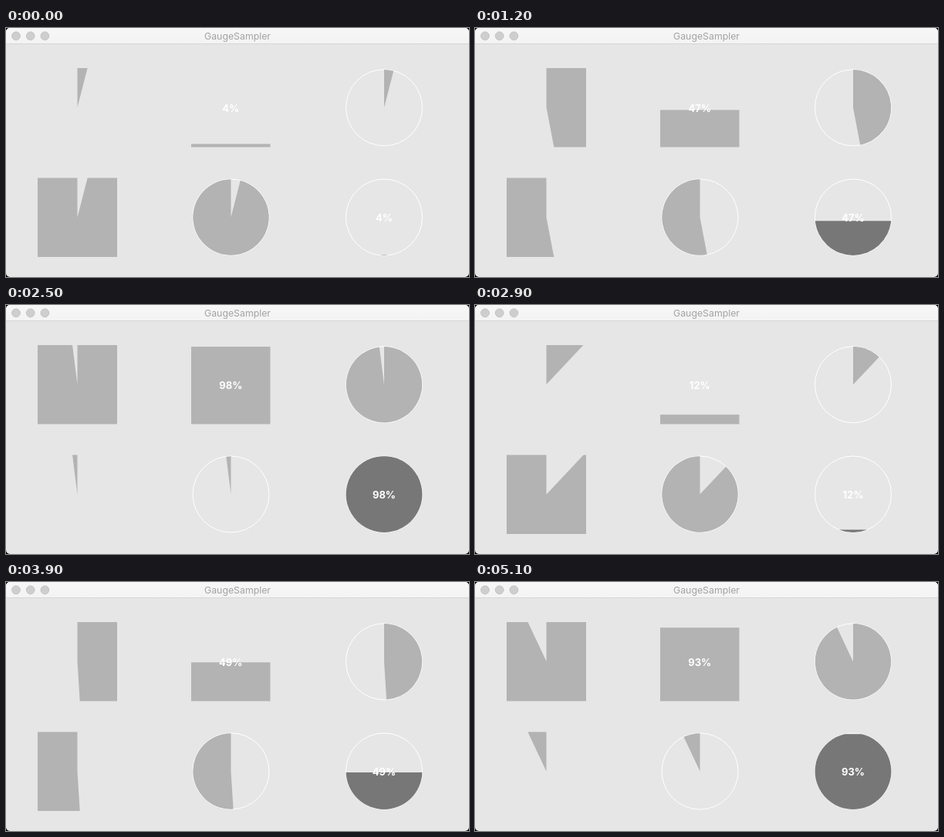
An HTML page that plays this animation: 600 by 323 pixels, repeating every 5.2 s.

```html
<!DOCTYPE html>
<html lang="en">
<head>
<meta charset="utf-8">
<title>GaugeSampler</title>
<style>
  html, body { margin: 0; width: 100%; height: 100%; overflow: hidden; background: #000; }
  svg { display: block; width: 600px; height: 323px; }
  text { font-family: Inter, "Open Sans", sans-serif; text-anchor: middle; }
  .title { font-size: 12.3px; fill: #a3a3a3; }
  .label { font-size: 13px; font-weight: 700; fill: #fff; }
  .fill { fill: #b3b3b3; }
  .level { fill: #777; }
  .ring { fill: none; stroke: #fff; stroke-width: 1; }
  .light { fill: #cecece; stroke: #bcbcbc; stroke-width: .8; }
</style>
</head>
<body>
<svg viewBox="0 0 600 323">
  <defs>
    <linearGradient id="bar" x2="0" y2="1">
      <stop offset="0" stop-color="#f7f7f7"/>
      <stop offset="1" stop-color="#f3f3f3"/>
    </linearGradient>
    <clipPath id="window"><rect width="600" height="323" rx="5"/></clipPath>
    <clipPath id="topBox"><rect x="41" y="52" width="103" height="102.5"/></clipPath>
    <clipPath id="lowBox"><rect x="41" y="194.5" width="103" height="102.5"/></clipPath>
  </defs>
  <g clip-path="url(#window)">
    <rect width="600" height="323" fill="#e6e6e6"/>
    <rect width="600" height="20" fill="url(#bar)"/>
    <rect y="20" width="600" height="1" fill="#d6d6d6"/>
    <circle class="light" cx="13" cy="10.3" r="5.4"/>
    <circle class="light" cx="31.7" cy="10.3" r="5.4"/>
    <circle class="light" cx="50.4" cy="10.3" r="5.4"/>
    <text class="title" x="300" y="15">GaugeSampler</text>

    <path id="boxPie" class="fill" clip-path="url(#topBox)"/>
    <path id="boxRest" class="fill" clip-path="url(#lowBox)"/>
    <rect id="column" class="fill" x="240" width="102.5"/>

    <circle class="ring" cx="490" cy="103.3" r="49.5"/>
    <circle class="ring" cx="291.5" cy="245.5" r="49.5"/>
    <circle class="ring" cx="490" cy="245.5" r="49.5"/>
    <path id="pie" class="fill"/>
    <path id="rest" class="fill"/>
    <path id="level" class="level"/>

    <text class="label" x="291.3" y="109"></text>
    <text class="label" x="490" y="251.3"></text>
  </g>
</svg>
<script>
const TICK = 100, TICKS = 52;
// [tick, running count]; the count wraps after 100
const KEYS = [[0, 4], [2, 12], [4, 12], [5, 19], [8, 31], [17, 68],
              [25, 98], [29, 113], [39, 150], [51, 194]];
const byId = id => document.getElementById(id);
const labels = document.querySelectorAll('.label');

function percentAt(tick) {
  const i = KEYS.findIndex(key => key[0] >= tick);
  if (i === 0) return KEYS[0][1];
  const [t0, v0] = KEYS[i - 1], [t1, v1] = KEYS[i];
  return Math.round(v0 + (v1 - v0) * (tick - t0) / (t1 - t0)) % 101;
}

// Point on a circle; turn 0 is at the top, clockwise
function point(cx, cy, r, turn) {
  const a = turn * 2 * Math.PI;
  return `${cx + r * Math.sin(a)} ${cy - r * Math.cos(a)}`;
}

function arc(cx, cy, r, from, to) {
  const large = to - from > 0.5 ? 1 : 0;
  return `${point(cx, cy, r, from)}A${r} ${r} 0 ${large} 1 ${point(cx, cy, r, to)}Z`;
}

const wedge = (cx, cy, r, from, to) => `M${cx} ${cy}L${arc(cx, cy, r, from, to)}`;

function setPath(id, d) {
  byId(id).setAttribute('d', d);
}

function draw(percent) {
  const p = percent / 100, height = 102.5 * p;
  setPath('boxPie', wedge(92.5, 103, 80, 0, p));
  setPath('boxRest', wedge(92.5, 245.7, 80, p, 1));
  setPath('pie', wedge(490, 103.3, 49.2, 0, p));
  setPath('rest', wedge(291.5, 245.5, 49.2, p, 1));
  setPath('level', 'M' + arc(490, 245.5, 49.4, 0.5 - p / 2, 0.5 + p / 2));
  byId('column').setAttribute('y', 154.5 - height);
  byId('column').setAttribute('height', height);
  labels.forEach(label => { label.textContent = percent + '%'; });
}

let shown = -1;
function frame() {
  const tick = Math.floor(performance.now() / TICK) % TICKS;
  if (tick !== shown) draw(percentAt(shown = tick));
  requestAnimationFrame(frame);
}
frame();
</script>
</body>
</html>
```
